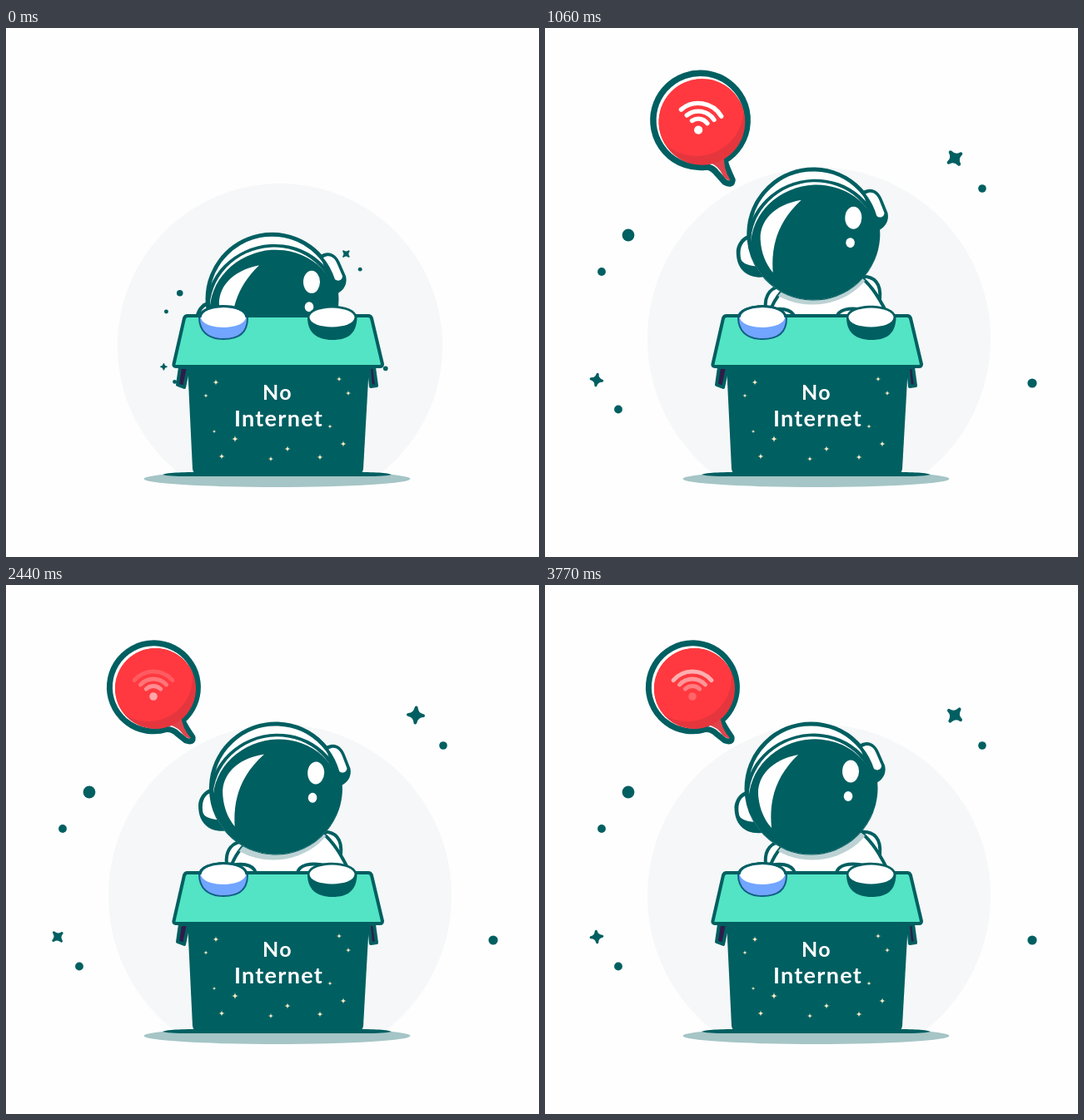
An HTML page that plays this animation: 640 px wide and 636 px high, repeating every 3.84 s.

```html
<!DOCTYPE html>
<html lang="en">
<head>
<meta charset="utf-8">
<title>No Internet</title>
<style>
  html, body { margin: 0; height: 100%; overflow: hidden; background: #fefefe; }
  svg { display: block; width: 100vw; height: 100vh; }
  .dark { fill: #005f61; }
  .white { fill: #fff; }
  .line { fill: #fff; stroke: #005f61; stroke-width: 4; stroke-linejoin: round; stroke-linecap: round; }
  text { font: 700 27px Lato, sans-serif; fill: #fff; text-anchor: middle; letter-spacing: 1.3px; }
</style>
</head>
<body>
<svg viewBox="0 0 640 636">
  <defs>
    <clipPath id="aboveGround"><path d="M0 0H640V538H0Z"/></clipPath>
    <clipPath id="helmetClip"><circle cx="319.5" cy="244.5" r="79"/></clipPath>
    <clipPath id="torsoClip"><path d="M266 352C272 325 285 312 300 300L380 298C392 308 402 322 416 352Z"/></clipPath>
    <clipPath id="redClip"><circle cx="179.5" cy="124.5" r="48.5"/></clipPath>
    <path id="star" class="dark" stroke="#005f61" stroke-width="4" stroke-linejoin="round"
      d="M0-9Q1-1 9 0Q1 1 0 9Q-1 1-9 0Q-1-1 0-9Z"/>
  </defs>

  <g clip-path="url(#aboveGround)"><circle id="halo" cx="329" cy="373.5" r="206" fill="#f5f7f8"/></g>

  <g id="confetti" class="dark">
    <circle cx="100" cy="249" r="7.4"/>
    <circle cx="68" cy="293" r="4.9"/>
    <circle cx="88" cy="458.5" r="4.9"/>
    <circle cx="585" cy="427" r="5.6"/>
    <circle cx="525" cy="193" r="4.8"/>
    <use id="starRight" href="#star"/>
    <use id="starLeft" href="#star"/>
  </g>

  <ellipse cx="325.5" cy="542" rx="160" ry="10" fill="#a5c5c6"/>
  <path class="dark" d="M188 537C195 534 215 534 240 534H410C440 534 455 534 463 537Q455 539 430 539H220Q195 539 188 537Z"/>

  <g id="body">
    <path class="line" d="M265 336C263 318 272 308 288 308L300 336Z"/>
    <path class="line" d="M378 297C396 295 404 306 402 324Z"/>
    <path class="line" d="M266 352C272 325 285 312 300 300L380 298C392 308 402 322 416 352Z"/>
    <g clip-path="url(#torsoClip)"><ellipse cx="321" cy="261.5" rx="78" ry="69" fill="#bcd2d4"/></g>
    <path class="line" d="M262 340C282 332 297 336 300 346M350 346C352 337 364 333 384 337"/>
  </g>

  <g id="head">
    <path class="dark" d="M247 247C237 247 229 255 227.5 266C227 288 240 300 260 298L268 270Z"/>
    <path class="white" d="M244 252C235 254 230.5 263 233 276C234 281 240 284 252 285L246 265Z"/>
    <circle class="line" cx="319.5" cy="244.5" r="78"/>
    <g clip-path="url(#helmetClip)"><g transform="rotate(-14 319.5 252)">
      <ellipse class="dark" cx="319.5" cy="253" rx="80" ry="74"/>
      <ellipse class="white" cx="319.5" cy="255" rx="76" ry="72.5"/>
      <ellipse class="dark" cx="320" cy="257" rx="77" ry="71"/>
    </g></g>
    <circle cx="319.5" cy="244.5" r="77" fill="none" stroke="#005f61" stroke-width="4"/>
    <path class="dark" d="M377 192C388 185 397 191 401 201L408 217C411 229 402 238 394 239Z"/>
    <path class="white" d="M381 195C389 190 395 195 398 203L404 217C404 222 399 224 395 221Q390 206 381 195Z"/>
    <path class="white" d="M304 204C269 211 255 232 256 252C257 268 263 282 272 292C269 262 275 232 304 204Z"/>
    <ellipse class="white" cx="367" cy="224" rx="10" ry="13.5"/>
    <ellipse class="white" cx="364" cy="254" rx="5.3" ry="6"/>
  </g>

  <g id="box">
    <path d="M209 408L206 429L214 432L219 408ZM436 408L438 431L445 430L442 408Z" fill="#2f1c48" stroke="#005f61" stroke-width="4" stroke-linejoin="round"/>
    <path class="dark" d="M218 405H436L429 530Q428 537 422 537H231Q225 537 224 530Z"/>
    <path d="M218 346H435Q438 346 439 349L452 404Q452 407 449 407H204Q201 407 201.5 404L214 349Q215 346 218 346Z" fill="#52e4c4" stroke="#005f61" stroke-width="4"/>
    <g id="sparkles" fill="#f7ecc4"></g>
    <text x="326" y="447" style="font-size:25px">No</text>
    <text x="327.5" y="479">Internet</text>
    <path d="M232 348C232 330 289 330 290 349C290 367 279 374 261 374C242 374 232 364 232 348Z" fill="#72a5ff" stroke="#125f83" stroke-width="2"/>
    <ellipse class="white" cx="261" cy="348" rx="27" ry="12"/>
    <path d="M233 348C234 330 288 330 289 348" fill="none" stroke="#005f61" stroke-width="3"/>
    <path class="dark" d="M362 348C362 329 420 329 421.5 348C421 367 411 375 392 375C373 375 362 366 362 348Z"/>
    <ellipse class="white" cx="391.5" cy="348" rx="27" ry="11.5"/>
  </g>

  <g id="bubble">
    <path class="line" style="stroke-width:7" d="M193 173.5Q200 173 206 179L216 187Q225 190 224 183Q215 170 212 163A53 53 0 1 0 193 173.5Z"/>
    <path fill="#e0434c" d="M196 168Q207 171 213 180Q218 185 222 184Q211 172 210 155Z"/>
    <circle cx="179.5" cy="124.5" r="48.5" fill="#e5363e"/>
    <g clip-path="url(#redClip)"><circle cx="171" cy="111" r="53" fill="#ff393f"/></g>
    <g id="wifi" fill="none" stroke="#fff" stroke-width="5" stroke-linecap="round">
      <circle cx="177" cy="134" r="4.8" fill="#fff" stroke="none"/>
    </g>
  </g>
</svg>
<script>
  const LOOP = 3840, WIFI_PERIOD = 1920, WIFI_START = 1540;
  const $ = id => document.getElementById(id);
  const clamp = x => Math.min(1, Math.max(0, x));
  const outCubic = x => 1 - (1 - clamp(x)) ** 3;
  const move = (id, transform) => $(id).setAttribute('transform', transform);
  const scaleAt = (x, y, s) => `translate(${x} ${y}) scale(${s}) translate(${-x} ${-y})`;

  function addPath(parent, d) {
    const path = document.createElementNS('http://www.w3.org/2000/svg', 'path');
    path.setAttribute('d', d);
    $(parent).append(path);
  }

  // Smooth interpolation through [time, value] keys
  function track(t, keys) {
    const next = keys.findIndex(key => key[0] > t);
    if (next === 0) return keys[0][1];
    if (next < 0) return keys[keys.length - 1][1];
    const [t0, a] = keys[next - 1], [t1, b] = keys[next];
    return a + (b - a) * (1 - Math.cos(Math.PI * (t - t0) / (t1 - t0))) / 2;
  }

  for (const [x, y, r] of [[252, 426, 4], [240, 442, 3], [400, 422, 3.5], [411, 439, 3.5], [389, 479, 3],
    [250, 485, 2.5], [275, 494, 4.5], [259, 515, 4], [318, 518, 3.5], [338, 506, 4], [377, 516, 4], [405, 500, 4]])
    addPath('sparkles', `M${x} ${y - r}Q${x} ${y} ${x + r} ${y}Q${x} ${y} ${x} ${y + r}` +
      `Q${x} ${y} ${x - r} ${y}Q${x} ${y} ${x} ${y - r}Z`);

  for (const [r, angle] of [[12.5, .77], [21, .83], [30, .87]]) {
    const dx = r * Math.sin(angle), y = 134 - r * Math.cos(angle);
    addPath('wifi', `M${177 - dx} ${y}A${r} ${r} 0 0 1 ${177 + dx} ${y}`);
  }
  const wifiParts = [...$('wifi').children];

  const sway = [[0, 0], [660, 2.6], [1500, 0], [2440, 2.2], [3120, 2.3], [3800, 0]];
  const bob = [[660, 0], [1060, 1], [1500, 0], [2440, 0], [3350, 2], [3770, 0]];
  const popScale = [[680, 0], [1070, 1.07], [1560, 1]];
  const popTurn = [[680, -50], [1070, 9.6], [1560, 0]];

  function draw(t) {
    const burst = outCubic(t / 650);
    move('halo', scaleAt(329, 538, .947 + .053 * burst));
    move('confetti', scaleAt(321.6, 391, .507 + .493 * burst));
    const spin = 45 + 360 * t / LOOP;
    move('starRight', `translate(492 156.5) rotate(${spin})`);
    move('starLeft', `translate(62 423) rotate(${spin + 45}) scale(.76)`);

    const drop = 81.5 * (1 - outCubic(t / 1500));
    move('body', `translate(0 ${drop})`);
    move('head', `translate(0 ${drop + track(t, bob)}) rotate(${track(t, sway)} 320 360)`);

    const size = track(t, popScale);
    $('bubble').style.display = size > 0 ? '' : 'none';
    move('bubble', `rotate(${track(t, popTurn)} 225 189) ${scaleAt(225, 189, size)}`);

    const phase = (t - WIFI_START + WIFI_PERIOD) % WIFI_PERIOD;
    wifiParts.forEach((part, i) => {
      const local = phase - 50 * i;
      part.style.opacity = 1 - clamp(local / 400) + clamp((local - 680) / 400);
    });
  }

  function tick() {
    draw(performance.now() % LOOP);
    requestAnimationFrame(tick);
  }
  tick();
</script>
</body>
</html>
```
